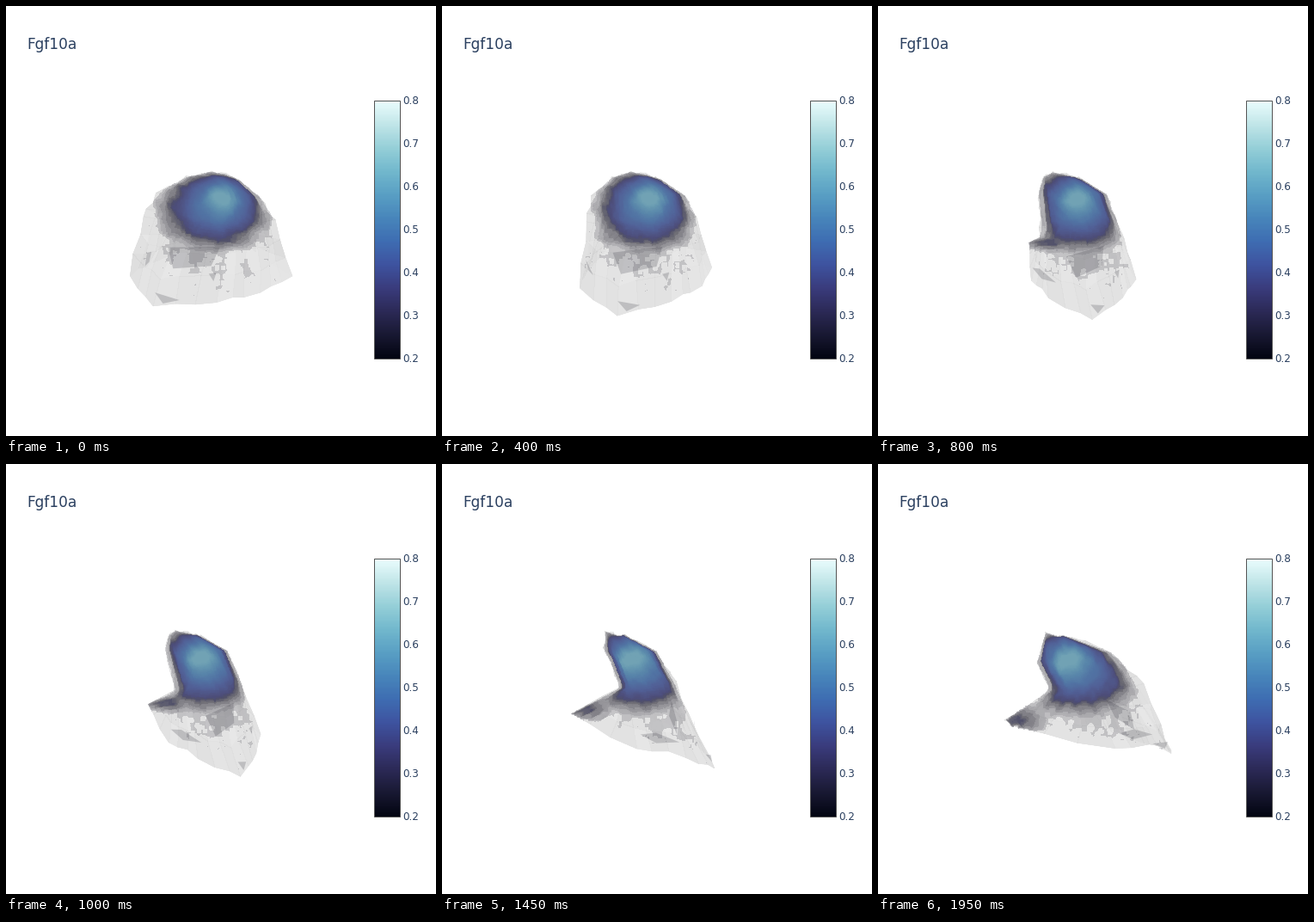
These frames come from a looping animation (500 by 500 pixels, 2 s). A matplotlib script:

```python
import numpy as np
import matplotlib.pyplot as plt
from matplotlib.animation import FuncAnimation
from matplotlib.collections import PolyCollection
from matplotlib.colors import LinearSegmentedColormap
from matplotlib.patches import Rectangle

SIZE, DPI, FRAMES, STEP = 500, 100, 40, 50
PX = 72 / DPI
INK = "#2a3f5f"
TURN = 0.05                       # radians per frame
EYE, TILT = 386, np.arctan2(0.5, np.hypot(1.25, 2))
CENTER = np.array([249, 260])
X0, X1, Y0, Y1 = 130, 350, 180, 380

ice = LinearSegmentedColormap.from_list("ice", [
    "#030512", "#191933", "#2c2a57", "#3a3c7d", "#3e53a0", "#3e6db2",
    "#4886bb", "#599fc4", "#72b8cd", "#95cfd8", "#c0e5e8", "#eafcfd"])
rng = np.random.default_rng(4)

# Rings of the body from crown to rim, each going round from the front
# by the right: (sideways, towards the viewer, down).
crown = [(-8, -35, -60), (10, -38, -58), (24, -40, -54), (8, -52, -60),
         (-12, -55, -64), (-28, -50, -60), (-42, -35, -58), (-28, -32, -58)]
shoulder = [(0, 0, -42), (28, -8, -40), (47, -20, -36), (34, -56, -28),
            (0, -56, -40), (-36, -50, -45), (-72, -3, -42), (-45, 2, -45)]
waist = [(8, 20, -5), (42, 2, -5), (68, -25, -5), (30, -42, 5),
         (-8, -41, 0), (-57, -20, -8), (-84, 18, -17), (-45, 25, -8)]
rim = [(-3, 50, 67), (44, 30, 65), (89, -20, 65), (32, -95, 37),
       (-22, -95, 29), (-80, -12, 44), (-96, 40, 43), (-69, 67, 65)]
rings = np.array([crown, shoulder, waist, rim], float)


def loft(u, w):
    """Point on the body: u runs round a ring (0-8), w from crown to rim (0-3)."""
    i = np.minimum(w.astype(int), 2)
    j = u.astype(int) % 8
    a, b = (u % 1)[..., None], (w - i)[..., None]
    upper = (1 - a) * rings[i, j] + a * rings[i, (j + 1) % 8]
    lower = (1 - a) * rings[i + 1, j] + a * rings[i + 1, (j + 1) % 8]
    return (1 - b) * upper + b * lower


def project(p, angle):
    x, z, down = np.moveaxis(p, -1, 0)
    c, s = np.cos(angle), np.sin(angle)
    side, near = x * c + z * s, z * c - x * s
    depth = near * np.cos(TILT) - down * np.sin(TILT)
    drop = down * np.cos(TILT) + near * np.sin(TILT)
    scale = EYE / (EYE - depth)
    return CENTER + np.stack([side * scale, drop * scale], -1)


def ball(p, center, radii):
    return np.sqrt((((p - center) / radii)**2).sum(-1))


# Outer skin: a slightly crumpled mesh.
w, u = np.meshgrid(np.linspace(0, 3, 10), np.arange(0, 8, 1 / 3), indexing="ij")
skin = loft(u, w)
skin += rng.normal(0, 1.3, skin.shape)

# Inside: sample points, each with a level of expression.
w, u, r = np.meshgrid(np.linspace(0, 3, 64), np.arange(0, 8, 1 / 18),
                      np.linspace(0.1, 1, 9), indexing="ij")
axis = loft(np.arange(8)[None, :] + 0 * w[:, 0, :1], w[:, 0, :1] + np.zeros(8)).mean(1)
points = axis[:, None, None] + r[..., None] * (loft(u, w) - axis[:, None, None])
ripple = sum(np.sin(points @ rng.normal(0, 0.22, 3) + rng.uniform(0, 6)) for _ in range(7))
dome = 1 - ball(points, (-6, -18, -22), (74, 80, 52)) + 0.012 * ripple
dome = np.minimum(np.minimum(dome, 0.72), 2.2 * (1 - r) + 0.05)
tail = 0.34 * np.clip(1.6 - 1.6 * ball(points, (5, -95, 32), (50, 45, 22)), 0, 1)
glow = np.exp(-ball(points, (5, -30, -38), (20, 20, 20))**2 / 2)
level = np.maximum(dome, tail) + 0.5 * glow * np.clip(dome / 0.35, 0, 1)
level += rng.normal(0, 0.012, level.shape) + 0.006 * ripple
points, level = points[level > 0.02], level[level > 0.02]

# Grey folds: under the dome, at the tip, on the flank, and a chip in front.
folds = [np.array(f, float) for f in (
    [(-58, 20, 16), (0, 18, 16), (-10, 25, 36), (-52, 28, 38)],
    [(-66, 62, 52), (-42, 58, 62), (-58, 64, 63)],
    [(-82, -5, 28), (-84, 10, 25), (-82, 32, 34), (-82, 10, 36)],
    [(-12, 45, 38), (-4, 45, 37), (-7, 46, 46)])]


def window(img, radius, reduce):
    """Separable square filter."""
    for ax_ in (0, 1):
        img = reduce([np.roll(img, d, ax_) for d in range(-radius, radius + 1)], axis=0)
    return img


def volume(angle):
    """Brightest level along each line of sight, as RGBA."""
    x, y = np.floor(project(points, angle)).astype(int).T
    img = np.zeros((Y1 - Y0, X1 - X0))
    np.maximum.at(img, (y - Y0, x - X0), level)
    img = window(window(img, 2, np.max), 2, np.min)
    img = 0.5 * img + 0.5 * window(img, 1, np.mean)

    m = np.clip(img / 0.35, 0, 1)
    m = 0.3 * m + 0.7 * np.floor(m * 5) / 5
    mix = np.clip((img - 0.3) / 0.1, 0, 1)
    tone = np.interp(img, [0.35, 0.6, 0.85, 1.15], [0.23, 0.36, 0.46, 0.7])
    blue = 0.75 * ice(tone)[..., :3] + 0.25 * 0.42
    rgb = np.array([0.2, 0.195, 0.24]) * (1 - mix[..., None]) + blue * mix[..., None]
    alpha = np.where(img > 0.03, 0.17 + 0.58 * m, 0)
    alpha += (0.95 - alpha) * mix
    return np.dstack([rgb, alpha])


fig = plt.figure(figsize=(SIZE / DPI, SIZE / DPI), dpi=DPI, facecolor="white")
ax = fig.add_axes([0, 0, 1, 1])


def label(x, y, text, px):
    ax.text(x, y, text, fontsize=px * PX, color=INK, va="baseline", family="DejaVu Sans")


def layer(z, **style):
    return ax.add_collection(PolyCollection([], zorder=z, **style), autolim=False)


body = layer(1, facecolor="#e7e7e7", edgecolor="#e7e7e7", lw=0.4)
shade = np.zeros((9 * 24, 4))
shade[:, 3] = rng.uniform(0, 0.025, len(shade))
facets = layer(2, facecolor=shade, lw=0, antialiased=False)
creases = layer(3, facecolor=(0.33, 0.33, 0.36, 0.26), lw=0)
cloud = ax.imshow(np.zeros((Y1 - Y0, X1 - X0, 4)), extent=(X0, X1, Y1, Y0),
                  interpolation="nearest", zorder=4)

ax.imshow(np.linspace(1, 0, 300)[:, None], cmap=ice, extent=(428, 458, 410, 110),
          aspect="auto", interpolation="nearest")
ax.add_patch(Rectangle((427.5, 109.5), 30, 300, fill=False, ec="#555555", lw=PX, zorder=5))
for i in range(7):
    label(461, 414 - 50 * i, f"{0.2 + 0.1 * i:.1f}", 12)
label(24, 50, "Fgf10a", 17)

ax.set(xlim=(0, SIZE), ylim=(SIZE, 0), aspect="auto")
ax.axis("off")


def draw(n):
    angle = n * TURN
    p = project(skin, angle)
    q = np.roll(p, -1, axis=1)
    quads = np.stack([p[:-1], q[:-1], q[1:], p[1:]], axis=2).reshape(-1, 4, 2)
    body.set_verts([*quads, p[0], p[-1]])
    facets.set_verts(quads)
    creases.set_verts([project(f, angle) for f in folds])
    cloud.set_data(volume(angle))
    return [body, facets, creases, cloud]


anim = FuncAnimation(fig, draw, frames=FRAMES, interval=STEP, repeat=True, repeat_delay=0)
plt.show()
```
